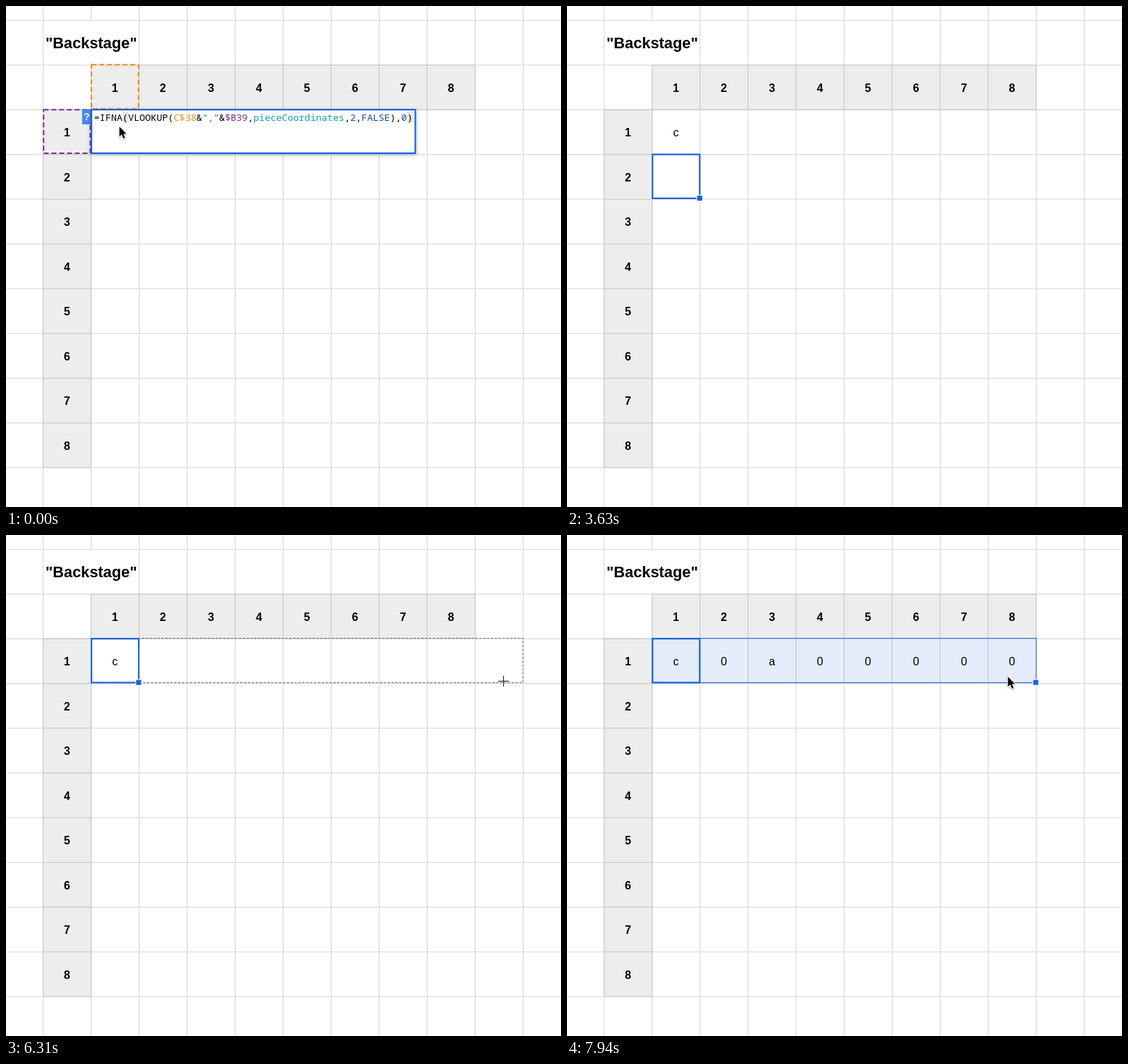
Recreate the animation shown at these times as an HTML page with a canvas. Size 787x711 px, loop 8000 ms.

```html
<!DOCTYPE html>
<html lang="en">
<head>
<meta charset="utf-8">
<title>Spreadsheet fill</title>
<style>
html, body { margin: 0; width: 100%; height: 100%; overflow: hidden; background: #fff; }
canvas { display: block; }
</style>
</head>
<body>
<canvas id="stage" width="787" height="711"></canvas>
<script>
const ctx = document.getElementById('stage').getContext('2d');
const LOOP = 8000, TICK = 62.5;
const BLUE = '#1c62dc', ORANGE = '#f08c18', PURPLE = '#7a2a90';
const SANS = '"Liberation Sans", Arial, sans-serif';
const MONO = '13.45px "Noto Sans Mono", monospace';
const CHAR = 8.07;

const colX = i => 52.6 + 68.08 * i;
const rowY = i => 20.3 + 63.48 * i;

const FORMULA = [
  ['=IFNA(VLOOKUP(', '#000'], ['C$38', ORANGE], ['&', '#000'], ['","', '#0b7a20'],
  ['&', '#000'], ['$B39', PURPLE], [',', '#000'], ['pieceCoordinates', '#169cbd'],
  [',', '#000'], ['2', '#1548c4'], [',', '#000'], ['FALSE', '#1548c4'],
  ['),', '#000'], ['0', '#1548c4'], [')', '#000']
];

// Pointer path: time, x, y and the shape used from that time on
const PATH = [
  [0, 160, 170.5, arrow], [250, 160.5, 174, arrow],
  [1190, 160.5, 174, arrow], [1440, 160.5, 171.5, arrow],
  [2625, 160.5, 171.5, arrow], [2812, 149, 165, ibeam], [2937, 142, 161, ibeam],
  [3125, 143, 163, ibeam], [3560, 143, 163, null],
  [4125, 143, 165, arrow], [4375, 149, 174, arrow],
  [4687, 149, 174, arrow], [4937, 191.7, 216.5, arrow], [5062, 193, 218, arrow],
  [5312, 189.5, 210.5, cross], [5437, 189.5, 209.5, cross],
  [5562, 189.5, 209.5, cross], [5937, 450, 212.5, cross], [6312, 705.5, 207.5, cross],
  [6375, 706, 207.5, cross], [7187, 655, 203.5, cross], [7375, 623.5, 201.5, cross],
  [7625, 624.5, 200.5, arrow], [LOOP, 624.5, 200.5, arrow]
];

function line(x1, y1, x2, y2, color, width = 1.3) {
  ctx.strokeStyle = color;
  ctx.lineWidth = width;
  ctx.beginPath();
  ctx.moveTo(x1, y1);
  ctx.lineTo(x2, y2);
  ctx.stroke();
}

function fill(x, y, w, h, color) {
  ctx.fillStyle = color;
  ctx.fillRect(x, y, w, h);
}

function frame(x, y, w, h, color, width, dash = []) {
  ctx.strokeStyle = color;
  ctx.lineWidth = width;
  ctx.setLineDash(dash);
  ctx.strokeRect(x, y, w, h);
  ctx.setLineDash([]);
}

function text(str, x, y, font, color = '#000', align = 'center') {
  ctx.font = font;
  ctx.fillStyle = color;
  ctx.textAlign = align;
  ctx.fillText(str, x, y);
}

const cellText = (str, col, row, weight = '') =>
  text(str, colX(col) + 33.8, rowY(row) + 38, `${weight} 16px ${SANS}`);

function sheet() {
  fill(0, 0, 787, 711, '#fff');
  for (let i = 0; i <= 10; i++) {
    line(colX(i), 0, colX(i), 711, '#dcdcdc');
    line(0, rowY(i), 787, rowY(i), '#dcdcdc');
  }
  fill(118, 21, 5, 61.8, '#fff'); // title overflows its cell
  fill(colX(1), rowY(1), colX(9) - colX(1), rowY(2) - rowY(1), '#ededed');
  fill(colX(0), rowY(2), colX(1) - colX(0), rowY(10) - rowY(2), '#ededed');
  for (let i = 1; i <= 9; i++) {
    line(colX(i), rowY(1), colX(i), rowY(2), '#cbcbcb');
    line(colX(0), rowY(i + 1), colX(1), rowY(i + 1), '#cbcbcb');
  }
  for (const i of [1, 2]) line(colX(1), rowY(i), colX(9), rowY(i), '#cbcbcb');
  for (const i of [0, 1]) line(colX(i), rowY(2), colX(i), rowY(10), '#cbcbcb');
  for (let i = 1; i <= 8; i++) {
    cellText(i, i, 1, 'bold');
    cellText(i, 0, i + 1, 'bold');
  }
  text('"Backstage"', 56, 60, `bold 21.8px ${SANS}`, '#000', 'left');
}

function editor(caret) {
  frame(121.3, 83.2, 66.6, 62.8, ORANGE, 2, [7, 4]);
  frame(53.3, 147.2, 66.2, 61.8, PURPLE, 2, [7, 4]);
  fill(108, 146.5, 13, 21.5, '#4a86e8');
  text('?', 114.5, 162, `bold 14px ${SANS}`, '#fff');
  ctx.save();
  ctx.shadowColor = 'rgba(60,64,67,.3)';
  ctx.shadowBlur = 6;
  ctx.shadowOffsetY = 2;
  fill(120, 146, 461.5, 64, BLUE);
  ctx.restore();
  fill(122.3, 148.2, 457, 59.6, '#fff');
  const left = 124.8;
  for (const i of [5, 55]) fill(left + i * CHAR, 150, CHAR, 16, '#e4e4e4');
  let x = left;
  for (const [part, color] of FORMULA) {
    text(part, x, 162.7, MONO, color, 'left');
    x += part.length * CHAR;
  }
  if (caret) fill(576, 149, 1.3, 17, '#000');
}

function handle(x, y) {
  fill(x - 4.5, y - 4.5, 9, 9, '#fff');
  fill(x - 3.5, y - 3.5, 7.2, 7.2, BLUE);
}

function selection(row) {
  frame(121.2, rowY(row) - .1, 67, 62.3, BLUE, 2.2);
}

function filledRow() {
  const top = rowY(2) - .6, bottom = rowY(3) - 1.2;
  fill(120.5, top, colX(9) - 120.5, bottom - top, '#e4ecfa');
  for (let i = 2; i <= 8; i++) line(colX(i), top, colX(i), bottom, '#bdc9dc');
  frame(120.8, top, colX(9) - 120.8, bottom - top, '#3b75d0', 1.3);
  [...'c0a00000'].forEach((v, i) => cellText(v, i + 1, 2));
}

function outlined(points, x, y) {
  ctx.save();
  ctx.translate(x, y);
  ctx.beginPath();
  points.forEach(([px, py]) => ctx.lineTo(px, py));
  ctx.closePath();
  ctx.shadowColor = 'rgba(0,0,0,.35)';
  ctx.shadowBlur = 2;
  ctx.shadowOffsetY = 1;
  ctx.lineJoin = 'round';
  ctx.lineWidth = 2;
  ctx.strokeStyle = '#fff';
  ctx.stroke();
  ctx.shadowColor = 'transparent';
  ctx.fillStyle = '#000';
  ctx.fill();
  ctx.restore();
}

function arrow(x, y) {
  outlined([[.8, .8], [.8, 14.8], [4, 11.8], [6.5, 17.6], [8.9, 16.5], [6.4, 10.9], [10.7, 10.7]], x, y);
}

function ibeam(x, y) {
  const strokes = [['#fff', 3], ['#000', 1.3]];
  for (const [color, width] of strokes) {
    line(x, y - 7, x, y + 8, color, width);
    line(x - 2.5, y + 3, x + 2.5, y + 3, color, width);
    for (const [end, mid] of [[-8.5, -6.5], [9.5, 7.5]]) {
      ctx.beginPath();
      ctx.moveTo(x - 4, y + end);
      ctx.quadraticCurveTo(x - .5, y + end, x, y + mid);
      ctx.quadraticCurveTo(x + .5, y + end, x + 4, y + end);
      ctx.stroke();
    }
  }
}

function cross(x, y) {
  for (const [color, width, r] of [['rgba(255,255,255,.9)', 3, 8], ['#222', 1.2, 7.5]]) {
    line(x - r, y, x + r, y, color, width);
    line(x, y - r, x, y + r, color, width);
  }
}

function pointerAt(t) {
  let i = PATH.length - 2;
  while (PATH[i][0] > t) i--;
  const [t0, x0, y0, shape] = PATH[i], [t1, x1, y1] = PATH[i + 1];
  const p = (t - t0) / (t1 - t0);
  return { x: x0 + (x1 - x0) * p, y: y0 + (y1 - y0) * p, shape };
}

function draw(t) {
  const pointer = pointerAt(t);
  sheet();
  if (t < 3560) {
    editor((t >= 187 && t < 687) || t >= 3060);
  } else if (t < 7930) {
    if (t >= 3620) cellText('c', 1, 2);
    const row = t < 4370 ? 3 : 2;
    const last = Math.floor((pointer.x - colX(0)) / 68.08);
    if (t > 5600 && last > 1) {
      frame(121, 146.5, Math.round(colX(last + 1)) - 121, 63, '#757575', 1, [3.5, 2]);
    }
    selection(row);
    handle(188, rowY(row + 1) - 1.6);
  } else {
    filledRow();
    selection(2);
    handle(664.7, rowY(3) - 1.6);
  }
  if (pointer.shape) pointer.shape(pointer.x, pointer.y);
}

let start;
function tick(now) {
  start ??= now;
  const t = (now - start) % LOOP;
  draw(Math.min(Math.floor((t + 5) / TICK) * TICK, LOOP - TICK));
  requestAnimationFrame(tick);
}
requestAnimationFrame(tick);
</script>
</body>
</html>
```
